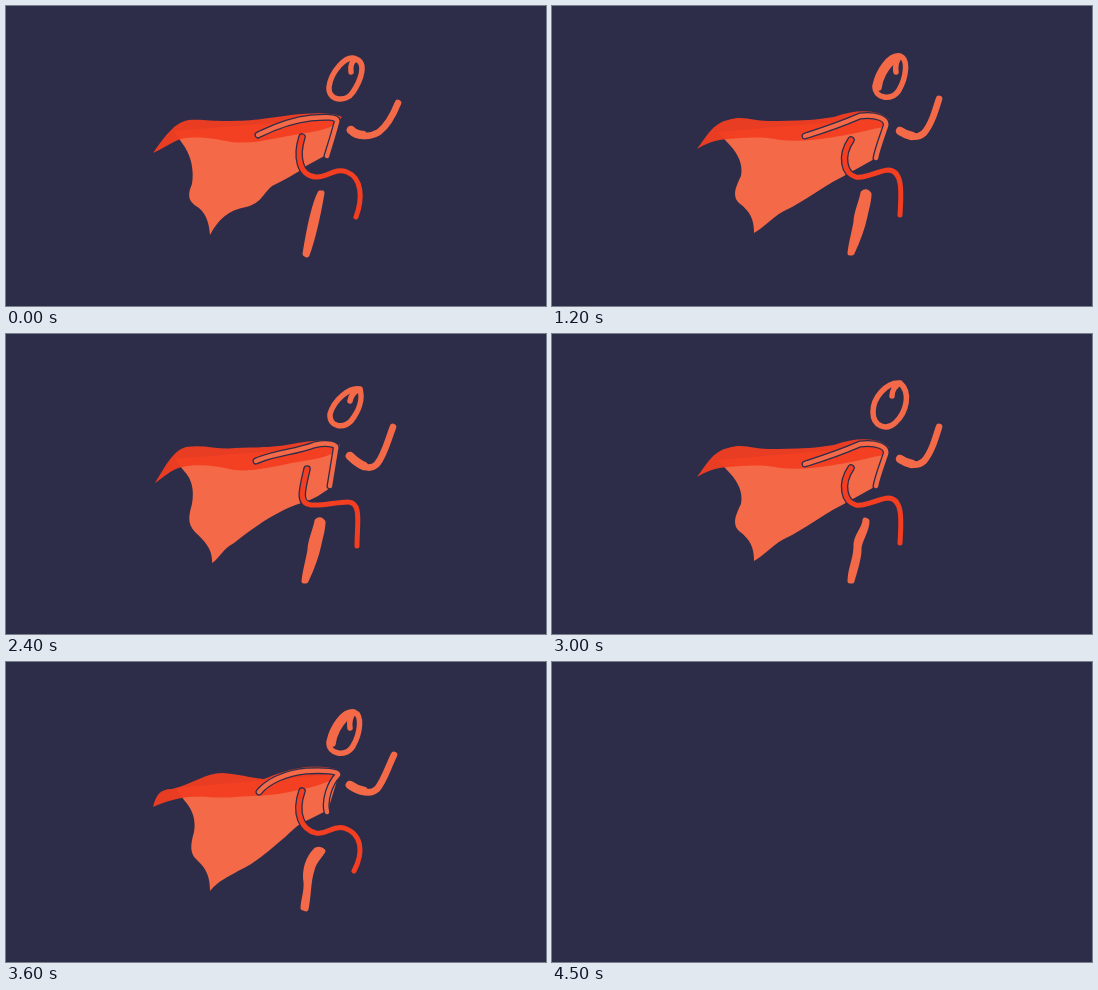
Recreate the animation shown at these times as an HTML page without scripts. Size 540x300 px, loop 5400 ms.

```html
<!DOCTYPE html>
<html lang="en">
<head>
<meta charset="utf-8">
<title>Running hero</title>
<style>
  :root { --night: #2d2d4a; --orange: #f46a48; --red: #f43e21; }
  html, body { margin: 0; width: 100%; height: 100%; overflow: hidden; background: var(--night); }
  svg { display: block; width: 100vw; height: 100vh; }
  path { stroke-linecap: round; stroke-linejoin: round; }
  .cloth { fill: var(--orange); stroke: none; }
  .fold { fill: var(--red); stroke: none; opacity: .94; }
  .line { fill: none; }
  .orange { stroke: var(--orange); }
  .red { stroke: var(--red); }
  .edge { stroke: var(--night); }
  .leg { fill: var(--orange); stroke-width: 5; }
  .fat { stroke-width: 8.5; }
</style>
</head>
<body>
<svg viewBox="0 0 540 300">
  <defs>
    <g id="off"></g>

    <!-- cape: cloth and its upper fold -->
    <g id="c0">
      <path class="cloth" d="M168 125L176 137C186 150 188 165 186 178C180 192 184 196 193 202C202 210 203 220 204 229C212 214 222 204 240 201C256 197 258 186 266 180C278 174 290 168 300 160L322 148L333 112Z"/>
      <path class="fold" d="M147 147C158 132 168 116 183 114C195 113 205 115 220 115C250 115 262 112 285 109C305 107 325 106 336 111L330 118C322 124 300 127 282 130C262 134 245 138 225 136C205 132 190 130 175 133C165 136 157 143 147 147Z"/>
    </g>
    <g id="c1">
      <path class="cloth" d="M167 125L175 137C186 148 193 158 190 168C186 178 179 180 179 187C184 198 195 200 198 208C201 216 202 222 203 227C212 222 222 214 232 209C250 198 265 184 282 178L302 165L322 152L335 112Z"/>
      <path class="fold" d="M148 148C158 134 166 117 178 112C192 108 210 110 226 111C245 115 262 114 283 110C302 106 330 106 338 114L332 122C320 122 300 128 284 130C262 137 245 138 228 137C208 132 190 130 174 135C164 139 156 144 148 148Z"/>
    </g>
    <g id="c2">
      <path class="cloth" d="M170 126L178 137C188 150 191 162 188 174C183 186 183 192 190 199C200 208 205 218 207 231C215 219 226 212 238 206C250 196 256 186 268 180C280 172 292 172 304 161L322 148L333 112Z"/>
      <path class="fold" d="M145 145C157 136 162 126 176 121C195 116 208 111 224 111C236 111 242 114 254 113C272 110 285 108 303 106C318 105 330 106 335 111L330 117C318 122 304 128 288 131C268 135 248 133 232 134C212 130 192 133 176 134C164 138 155 143 145 145Z"/>
    </g>
    <g id="c3">
      <path class="cloth" d="M169 125L178 137C187 146 188 158 186 170C182 184 182 190 189 198C199 207 207 216 206 229C214 224 216 215 228 209C242 198 258 186 274 178C288 170 302 168 312 162L324 154L332 112Z"/>
      <path class="fold" d="M149 149C158 135 166 117 180 113C198 110 212 116 230 114C250 113 264 114 286 110C304 106 326 105 334 111L329 118C318 125 302 126 286 129C266 133 246 138 228 136C208 131 190 130 176 133C164 136 157 144 149 149Z"/>
    </g>
    <g id="c4">
      <path class="cloth" d="M166 126L174 135C187 148 191 158 189 170C182 184 181 191 187 197C199 206 202 214 202 227C214 220 222 209 236 203C254 194 272 180 290 171L326 151L335 112Z"/>
      <path class="fold" d="M145 143C155 130 160 118 176 114C192 109 200 115 216 115C238 115 258 115 282 111C304 103 328 103 337 114L332 121C318 123 304 128 288 130C266 134 246 136 228 134C208 130 192 132 176 133C162 134 153 138 145 143Z"/>
    </g>
    <g id="c5">
      <path class="cloth" d="M170 126L178 138C187 148 190 158 188 170C184 184 184 192 191 198C201 207 204 216 204 229C212 219 222 215 232 209C248 202 260 191 272 181C284 172 290 162 302 158L322 148L333 112Z"/>
      <path class="fold" d="M147 145C150 133 154 127 166 127C186 122 200 111 216 111C234 112 244 116 258 117C270 112 284 107 300 105C316 104 330 105 335 110L330 116C318 122 304 126 288 129C268 134 246 134 230 135C212 137 192 133 176 136C164 138 156 141 147 145Z"/>
    </g>

    <!-- shoulder and torso -->
    <path id="s0" class="line" d="M252 129C268 121 285 114 305 112C318 111 333 110 331 116C328 128 324 140 321 150"/>
    <path id="s1" class="line" d="M250 126C265 121 285 115 300 112C318 109 337 112 334 118C330 130 317 138 322 151"/>
    <path id="s2" class="line" d="M252 128C270 118 285 113 305 110C325 108 333 110 331 115C328 128 322 138 320 150"/>
    <path id="s3" class="line" d="M250 127C268 119 290 118 308 111C322 108 332 110 330 115L324 152"/>
    <path id="s4" class="line" d="M253 130C272 124 292 117 308 110C325 108 336 113 334 120C330 132 326 142 324 152"/>
    <path id="s5" class="line" d="M253 130C262 119 280 111 300 109C318 108 333 109 332 113C324 121 318 138 321 150"/>

    <!-- head -->
    <path id="h0" class="line" d="M350 53C340 48 325 66 323 81C322 95 340 97 347 86C355 74 361 57 350 53C346 55 344 60 345 66"/>
    <path id="h1" class="line" d="M351 52C342 48 329 66 322 82C320 92 340 94 346 84C353 72 356 55 351 52C346 54 343 59 344 65"/>
    <path id="h2" class="line" d="M346 49C334 48 324 66 323 80C324 95 339 98 346 86C355 72 356 52 346 49C342 52 340 57 340 63"/>
    <path id="h3" class="line" d="M354 55C343 53 328 66 324 80C323 93 337 95 345 87C353 77 357 65 354 55C349 57 345 61 344 67"/>
    <path id="h4" class="line" d="M348 49C334 48 321 64 321 78C321 92 334 97 343 89C355 78 359 58 348 49C343 52 340 56 340 62"/>
    <g id="h5">
      <path class="line" d="M348 50C337 48 326 66 323 80C322 92 340 96 347 84C354 72 357 53 348 50C344 55 343 60 344 66"/>
      <path class="line" d="M341 55C333 63 328 73 327 82"/>
    </g>

    <!-- raised arm -->
    <g id="a0">
      <path class="line" d="M344 124C352 131 363 132 373 126C382 119 388 107 392 97"/>
      <path class="line fat" d="M345 124Q350 129 357 129"/>
    </g>
    <g id="a1">
      <path class="line" d="M347 125C354 130 363 131 372 124C381 116 386 104 389 94"/>
      <path class="line fat" d="M347 125Q352 129 358 128"/>
    </g>
    <g id="a2">
      <path class="line" d="M344 123C354 131 366 138 376 129C385 121 387 106 387 93"/>
      <path class="line fat" d="M345 123Q353 129 360 132"/>
    </g>
    <g id="a3">
      <path class="line" d="M343 122C352 131 363 138 371 130C378 122 382 106 387 93"/>
      <path class="line fat" d="M344 122Q351 129 358 132"/>
    </g>
    <g id="a4">
      <path class="line" d="M348 125C355 130 364 134 372 127C379 119 383 106 387 93"/>
      <path class="line fat" d="M348 125Q354 129 360 130"/>
    </g>
    <g id="a5">
      <path class="line" d="M343 123C352 129 363 134 371 127C378 119 382 105 388 93"/>
      <path class="line fat" d="M344 123Q351 128 358 129"/>
    </g>

    <!-- bent leg -->
    <path id="k0" class="line" d="M296 131C290 150 293 170 310 171C322 172 328 161 341 166C356 172 357 192 350 211"/>
    <path id="k1" class="line" d="M298 131L297 160C297 176 316 172 325 166C336 160 348 168 352 183C354 195 351 203 349 211"/>
    <path id="k2" class="line" d="M296 130C293 160 297 170 308 171C322 171 328 163 340 167C355 174 358 195 349 209"/>
    <path id="k3" class="line" d="M301 135C296 156 292 170 305 171C318 172 330 168 342 168C356 168 351 190 351 212"/>
    <path id="k4" class="line" d="M299 134C288 150 292 168 304 171C314 173 325 165 336 164C352 164 349 190 348 209"/>
    <path id="k5" class="line" d="M296 129C288 152 296 168 310 171C322 173 326 163 338 166C356 172 358 190 348 209"/>

    <!-- straight leg -->
    <path id="l0" class="leg" d="M314 187C309 197 304 216 299 248L301 249C305 238 311 216 316 187Z"/>
    <path id="l1" class="leg" d="M311 187C306 206 300 228 297 246L299 247C306 232 314 212 317 189Q315 184 311 187Z"/>
    <path id="l2" class="leg" d="M310 184C301 205 296 222 295 243L298 245C301 225 304 208 313 185Z"/>
    <path id="l3" class="leg" d="M311 187C309 198 304 206 304 216C302 228 299 236 298 247L300 247C306 234 311 220 313 210C315 200 317 196 317 188Q314 184 311 187Z"/>
    <path id="l4" class="leg" d="M313 186C313 195 303 202 304 212C304 226 298 234 298 247L300 247C303 236 308 222 307 214C308 204 315 198 315 187Z"/>
    <path id="l5" class="leg" d="M310 188C302 196 298 208 300 220C301 230 297 238 297 246L300 247C303 234 302 218 306 208C308 198 313 196 317 189Q314 186 310 188Z"/>
  </defs>

  <rect width="540" height="300" fill="#2d2d4a"/>

  <use href="#c0">
    <animate attributeName="href" calcMode="discrete" dur="5.4s" repeatCount="indefinite" values="#c0;#c5;#c1;#c3;#c4;#c0;#c2;#c4;#c3;#c2;#c4;#c1;#c5;#c2;#c1;#off;#off;#off"/>
  </use>
  <use href="#s0" class="edge" stroke-width="7">
    <animate attributeName="href" calcMode="discrete" dur="5.4s" repeatCount="indefinite" values="#s0;#s5;#s1;#s3;#s4;#s0;#s2;#s4;#s3;#s2;#s4;#s1;#s5;#s2;#s1;#off;#off;#off"/>
  </use>
  <use href="#s0" class="orange" stroke-width="4.4">
    <animate attributeName="href" calcMode="discrete" dur="5.4s" repeatCount="indefinite" values="#s0;#s5;#s1;#s3;#s4;#s0;#s2;#s4;#s3;#s2;#s4;#s1;#s5;#s2;#s1;#off;#off;#off"/>
  </use>
  <use href="#h0" class="orange" stroke-width="5.5">
    <animate attributeName="href" calcMode="discrete" dur="5.4s" repeatCount="indefinite" values="#h0;#h4;#h1;#h3;#h5;#h0;#h2;#h4;#h3;#h2;#h4;#h1;#h5;#h2;#h1;#off;#off;#off"/>
  </use>
  <use href="#a0" class="orange" stroke-width="6.6">
    <animate attributeName="href" calcMode="discrete" dur="5.4s" repeatCount="indefinite" values="#a0;#a5;#a1;#a3;#a4;#a5;#a2;#a4;#a3;#a0;#a4;#a1;#a5;#a0;#a0;#off;#off;#off"/>
  </use>
  <use href="#l0" class="orange">
    <animate attributeName="href" calcMode="discrete" dur="5.4s" repeatCount="indefinite" values="#l0;#l5;#l1;#l0;#l3;#l2;#l2;#l2;#l3;#l0;#l4;#l3;#l5;#l2;#l2;#off;#off;#off"/>
  </use>
  <use href="#k0" class="edge" stroke-width="7.6">
    <animate attributeName="href" calcMode="discrete" dur="5.4s" repeatCount="indefinite" values="#k0;#k3;#k1;#k5;#k4;#k0;#k2;#k5;#k3;#k0;#k4;#k2;#k5;#k1;#k0;#off;#off;#off"/>
  </use>
  <use href="#k0" class="red" stroke-width="5">
    <animate attributeName="href" calcMode="discrete" dur="5.4s" repeatCount="indefinite" values="#k0;#k3;#k1;#k5;#k4;#k0;#k2;#k5;#k3;#k0;#k4;#k2;#k5;#k1;#k0;#off;#off;#off"/>
  </use>
</svg>
</body>
</html>
```
